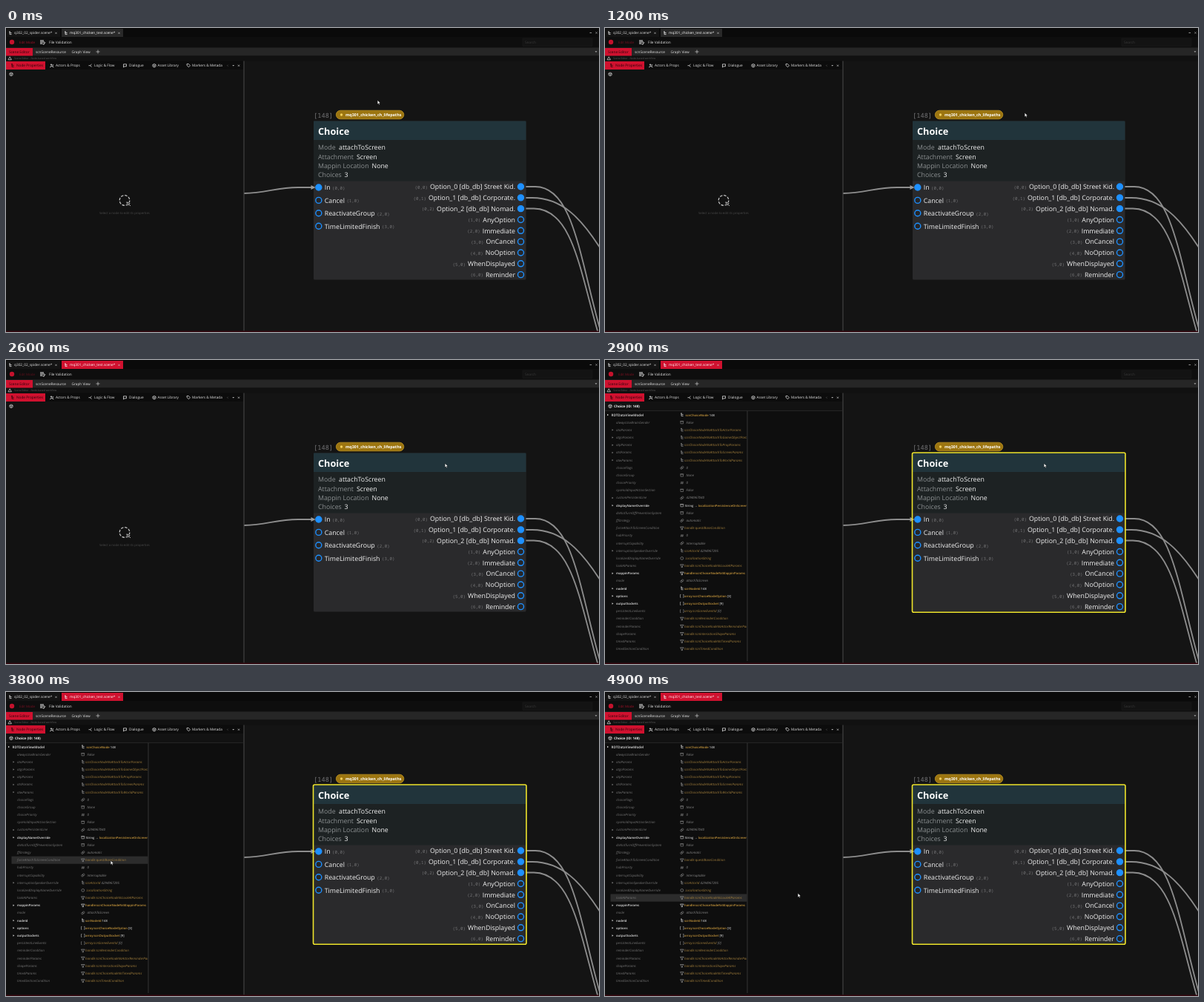
Write an HTML page that moves like this. It is 800 by 410 pixels and loops after 5000 ms.

```html
<!DOCTYPE html>
<html lang="en">
<head>
<meta charset="utf-8">
<title>Scene editor</title>
<style>
html, body { margin: 0; width: 100%; height: 100%; overflow: hidden; background: #111; }
svg { display: block; width: 800px; height: 410px; font-family: "Open Sans", "Noto Sans", sans-serif; text-rendering: geometricPrecision; }
text { white-space: pre; }
.mono { font-family: "Noto Sans Mono", "DejaVu Sans Mono", monospace; fill: #747476; }
.b { font-weight: 700; }
.s { font-weight: 600; }
.i { font-style: italic; }

.idle, .picked, .framed, .tab, .hot { animation: 5s step-end infinite; }
.idle { animation-name: idle; }
.picked { animation-name: picked; }
.framed { animation-name: framed; }
.tab { animation-name: tab; }
.row-a { animation-name: row-a; }
.row-b { animation-name: row-b; }
.socket { animation-name: socket; }
.mode { animation: mode 1.6667s ease-in-out infinite; }
.cursor { animation: move 5s linear infinite; }

@keyframes idle { 0% { opacity: 1 } 58%, 100% { opacity: 0 } }
@keyframes picked { 0% { opacity: 0 } 58%, 100% { opacity: 1 } }
@keyframes framed { 0% { opacity: 0 } 56%, 100% { opacity: 1 } }
@keyframes tab { 0% { fill: #292929 } 26% { fill: #7c1a2a } 28%, 100% { fill: #d0112f } }
@keyframes row-a { 0% { opacity: 0 } 74% { opacity: 1 } 80%, 100% { opacity: 0 } }
@keyframes row-b { 0% { opacity: 0 } 92%, 100% { opacity: 1 } }
@keyframes socket { 0% { opacity: 0 } 80% { opacity: 1 } 88%, 100% { opacity: 0 } }
@keyframes mode { 0%, 100% { opacity: .75 } 50% { opacity: .4 } }
@keyframes move {
  0% { transform: translate(502px, 100px); animation-timing-function: steps(12) }
  24% { transform: translate(567px, 117px); animation-timing-function: steps(12) }
  48%, 66% { transform: translate(593px, 142px); animation-timing-function: steps(4) }
  74%, 78% { transform: translate(142px, 230px); animation-timing-function: steps(2) }
  82% { transform: translate(440px, 267px); animation-timing-function: steps(2) }
  86% { transform: translate(392px, 271px); animation-timing-function: steps(4) }
  94% { transform: translate(155px, 277px); animation-timing-function: steps(2) }
  98%, 100% { transform: translate(261px, 274px) }
}
</style>
</head>
<body>
<svg id="stage" viewBox="0 0 800 410" xmlns="http://www.w3.org/2000/svg"></svg>
<script>
const BLUE = '#1e90ff', RED = '#d0112f';

const rect = (x, y, w, h, fill, more = '') =>
  `<rect x="${x}" y="${y}" width="${w}" height="${h}" fill="${fill}" ${more}/>`;
const circle = (x, y, r, fill, more = '') =>
  `<circle cx="${x}" cy="${y}" r="${r}" fill="${fill}" ${more}/>`;
const line = (d, stroke, w = 1, more = '') =>
  `<path d="${d}" fill="none" stroke="${stroke}" stroke-width="${w}" ${more}/>`;
const text = (x, y, size, fill, str, more = '') =>
  `<text x="${x}" y="${y}" font-size="${size}" fill="${fill}" ${more}>${str}</text>`;
const ui = (x, y, str, fill = '#e4e4e4') => text(x, y + 1.7, 4.75, fill, str);
const cross = (x, y, fill = '#ccc') =>
  line(`M${x - 1.1} ${y - 1.1}l2.2 2.2m0 -2.2l-2.2 2.2`, fill, .6);
const cube = (x, y, fill = '#ddd') =>
  line(`M${x} ${y - 2.3}l2.1 1.1v2.4l-2.1 1.1l-2.1 -1.1v-2.4zm-2.1 1.1l2.1 1.1l2.1 -1.1m-2.1 1.1v2.4`, fill, .7);
const tree = (x, y, fill) =>
  line(`M${x - 2} ${y - 2}h2m-1 0v3.6h2.6m-2.6 -2h2.6`, fill, .8);

function chrome() {
  return rect(0, 0, 800, 12, '#0a0a0a') + rect(0, 12, 800, 14.5, '#0e0e0e') +
    rect(0, 26.5, 800, 11, '#262626') + rect(0, 37.5, 800, 7, '#111') +
    rect(1, 1, 72, 11, '#141414') +
    `<rect class="tab" x="75" y="1" width="83" height="11" fill="#292929"/>` +
    tree(6, 7, '#ddd') + ui(11, 6.6, 'q302_02_spider.scene*') + cross(67.5, 6.8) +
    tree(81, 7, '#eee') + ui(86, 6.6, 'mq301_chicken_test.scene*', '#fff') + cross(152.5, 6.8) +
    line('M787.5 6.5h2.6', '#ccc', .7) + cross(796.5, 6.5) +
    circle(8, 19, 3.2, '#c4122d') +
    text(18, 20.8, 4.45, RED, 'Edit Mode', 'class="mode"') +
    line('M46 17h5m-5 2h6m-6 2h3', '#eee', 1) + line('M49.5 21l1.2 1.3l2.2 -3', '#eee', 1) +
    ui(58, 19, 'File Validation') +
    rect(697, 14, 94, 10.5, '#131313', 'stroke="#1b1b1b" stroke-width=".6"') + ui(700, 19.2, 'Search', '#383838') +
    rect(0, 27, 36, 10.5, RED) + ui(4, 32, 'Scene Editor', '#26040a') +
    ui(40, 32, 'scnSceneResource') + ui(88.5, 32, 'Graph View') +
    line('M121.5 32h5m-2.5 -2.5v5', '#ccc', .7) +
    `<path d="M794.5 31.2h3l-1.5 1.7z" fill="#aaa"/>` +
    line('M3 42.8l2.2 -4l2.2 4z', '#ccc', .8) +
    text(11, 42.3, 3.4, '#5c5c5c', 'Scene Editor - Node-based workflow');
}

function sideTabs() {
  return rect(0, 44.5, 320.5, 364, '#121212') + rect(0, 44.5, 320.5, 11.5, '#0c0c0c') +
    rect(0, 45, 53, 11, RED) + tree(9, 50.7, '#26040a') + ui(14, 50.6, 'Node Properties', '#26040a') +
    circle(61, 49.5, 1, '#ddd') + circle(63.3, 50, .8, '#ddd') + line('M59.3 52.8q2.5 -2.8 5 0', '#ddd', 1) +
    ui(67, 50.6, 'Actors &amp; Props') +
    line('M111.5 50.7h2l2 -1.8m-2 1.8l2 1.8', '#ddd', .8) + ui(119, 50.6, 'Logic &amp; Flow') +
    line('M158.5 48.8h4v3h-2.5l-1.5 1.2z', '#ddd', .8) + ui(166, 50.6, 'Dialogue') +
    cube(200, 50.7) + ui(204.5, 50.6, 'Asset Library') +
    line('M244 48.5h2.3l2.2 2.2l-2 2l-2.5 -2.3z', '#ddd', .8) + ui(251, 50.6, 'Markers &amp; Metada') +
    line('M299.5 49.7l-1 1l1 1', '#777', .5) +
    `<path d="M305.3 50h2.8l-1.4 1.6z" fill="#bbb"/>` + cross(314, 50.7, '#ddd') +
    cube(7, 62.3);
}

function placeholder() {
  return `<g class="idle">` +
    circle(160, 232.5, 6.8, 'none', 'stroke="#c2c2c2" stroke-width="1.3" stroke-dasharray="3.5 1.84"') +
    rect(163, 235, 6, 6, '#121212') +
    line('M162.8 234.8l4.4 1.7l-1.9 .9l-.9 1.9zm2.6 2.6l2.6 2.6', '#c2c2c2', .9) +
    text(126, 250.5, 4.28, '#4a4a4a', 'Select a node to edit its properties') + `</g>`;
}

// mark (+ expandable, * strong) | label | icon | value | extra
const ROWS = `
+*|RDTDataViewModel|t|scnChoiceNode|148
|alwaysUseBrainGender|b||False
+|ataParams|t|scnChoiceNodeNsAttachToActorParams
+|atgoParams|t|scnChoiceNodeNsAttachToGameObjectParams
+|atpParams|t|scnChoiceNodeNsAttachToPropParams
+|atsParams|t|scnChoiceNodeNsAttachToScreenParams
+|atwParams|t|scnChoiceNodeNsAttachToWorldParams
|choiceFlags|l||0
|choiceGroup|b||None
|choicePriority|#||0
|cpoHoldInputActionSection|b||False
+|customPersistentLine|l||4294967040
+*|displayNameOverride|b||String → |localizationPersistenceOnScreen
|doNotTurnOffPreventionSystem|b||False
|ffStrategy|l||automatic
|forceAttachToScreenCondition|h|handle:questIBaseCondition
|hubPriority|#||0
|interruptCapability|l||Interruptable
+|interruptionSpeakerOverride|t|scnActorId|4294967295
|localizedDisplayNameOverride|o|LocalizationString
|lookAtParams|h|handle:scnChoiceNodeNsLookAtParams
+*|mappinParams|h|handle:scnChoiceNodeNsMappinParams
|mode|l||attachToScreen
+*|nodeId|t|scnNodeId|148
+*|options|a|array:scnChoiceNodeOption|[3]
+*|outputSockets|a|array:scnOutputSocket|[9]
|persistentLineEvents|a|array:scnSceneEventId|[0]
|reminderCondition|h|handle:scnReminderCondition
|reminderParams|h|handle:scnChoiceNodeNsActorReminderParams
|shapeParams|h|handle:scnInteractionShapeParams
|timedParams|h|handle:scnChoiceNodeNsTimedParams
|timedSectionCondition|h|handle:scnTimedCondition`.trim().split('\n').map(r => r.split('|'));

const rowY = n => 74 + n * 10.18;

const ICONS = {
  t: (y, c) => tree(104, y, c),
  b: (y, c) => line(`M102 ${y - 1.5}h3.5v3.2h-3.5zm-.8 0h5`, c, .6),
  l: (y, c) => circle(103, y + .7, 1.3, 'none', `stroke="${c}" stroke-width=".6"`) + circle(104.7, y - .7, 1.3, 'none', `stroke="${c}" stroke-width=".6"`),
  '#': (y, c) => line(`M103.2 ${y - 1.8}l-.6 3.6m2.5 -3.6l-.6 3.6m-2.5 -2.5h4m-4.3 1.4h4`, c, .5),
  h: (y, c) => line(`M101.5 ${y - 1.7}h4.6l-1.6 2v1.7h-1.4v-1.7z`, c, .8),
  o: (y, c) => circle(103.8, y, 1.9, 'none', `stroke="${c}" stroke-width=".7"`),
  a: (y, c) => line(`M102.5 ${y - 1.9}h-1v3.8h1m2.6 -3.8h1v3.8h-1`, c, .6)
};

function property([mark, label, icon, type, plain = '', link = ''], n) {
  const y = rowY(n), strong = mark.includes('*'), open = mark.includes('+');
  const gray = strong ? '#c0c0c0' : '#8a8a8a', gold = strong ? '#c4953c' : '#a5803d';
  const face = strong ? 'class="s"' : 'class="i"';
  const size = strong ? (n ? 4.25 : 4.6) : 4.45;
  const x = !type ? 109.5 : n && icon !== 'o' ? 107 : 108.5;
  const gap = type && plain ? ' ' : '';
  const value = `<tspan fill="${gold}">${type}</tspan>${gap}${plain}<tspan fill="${gold}">${link}</tspan>`;
  return (open ? `<path d="M${n ? 9.5 : 3} ${y - 1.2}l1.8 1.2l-1.8 1.2z" fill="${strong ? '#ddd' : '#888'}"/>` : '') +
    text(n ? 15 : 8.5, y + 1.5, size, strong ? '#e2e2e2' : '#767676', label, face) +
    ICONS[icon](y, gray) + text(link ? 107.5 : x, y + 1.5, strong ? 4.2 : 4.45, gray, value, face);
}

function properties() {
  const bar = (n, name) => `<g class="hot ${name}">` + rect(7.5, rowY(n) - 5.1, 184, 10.2, '#2c2c2c') + `</g>`;
  return `<g class="picked">` + rect(0, 68, 320.5, 340, '#0e0e0e') +
    text(12, 64.2, 4.6, '#eee', 'Choice (ID: 148)', 'class="b"') +
    line('M0 68.5H320', '#2a2a2a', .8) + line('M192 68.5V406', '#343434', 1) +
    bar(15, 'row-a') + bar(20, 'row-b') +
    `<g clip-path="url(#cols)">${ROWS.map(property).join('')}</g></g>`;
}

function pin(x, y, full) {
  return circle(x, y, 4, full ? BLUE : '#262628', `stroke="${BLUE}" stroke-width="1.4"`);
}

function wires() {
  const wire = d => line(d, '#8d8d8d', 1.8);
  return wire('M321 223C352 222.5 364 215 394 215H413') +
    wire('M699 214H714C766 214 774 312 803 412') +
    wire('M699 229H710C750 229 776 257 801 296') +
    wire('M699 243.5H712C764 243.5 774 326 799 412');
}

function node() {
  const facts = [['Mode', 'attachToScreen', 449], ['Attachment', 'Screen', 473],
    ['Mappin Location', 'None', 493.5], ['Choices', '3', 456.5]];
  const inputs = ['In', 'Cancel', 'ReactivateGroup', 'TimeLimitedFinish'];
  const outputs = ['Option_0 [db_db] Street Kid.', 'Option_1 [db_db] Corporate.', 'Option_2 [db_db] Nomad.',
    'AnyOption', 'Immediate', 'OnCancel', 'NoOption', 'WhenDisplayed', 'Reminder'];
  const tag = (s, dx = 0) => `<tspan class="mono" font-size="5.8" dx="${dx}" dy="-.6">${s}</tspan>`;
  let out = text(415, 120.5, 8.7, '#747476', '[148]', 'class="mono"') +
    rect(445.3, 111.2, 91.5, 11.6, '#9c7510', 'rx="5.8" stroke="#bd9423" stroke-width=".8"') +
    circle(452.5, 117, 1.7, '#f4cf58') +
    text(458, 118.9, 5.4, '#fff', 'mq301_chicken_ch_lifepaths', 'class="b"') +
    rect(415, 125.5, 286.5, 214, '#2a2a2c', 'rx="1.5"') +
    rect(415, 125.5, 286.5, 25.5, '#21343b') + rect(415, 151, 286.5, 55.5, '#1d2223') +
    text(421, 143.6, 12.7, '#fff', 'Choice', 'class="b"');
  facts.forEach(([key, value, x], n) => {
    const y = 164.4 + n * 12.35;
    out += text(421, y, 8.8, '#8c9092', key) + text(x, y, 8.8, '#f2f2f2', value);
  });
  out += `<g class="hot socket">${rect(417, 260, 109, 14.5, 'url(#glow)')}</g>`;
  inputs.forEach((s, n) => {
    const y = 215 + n * 17.4;
    out += pin(421.8, y, n === 0) + text(429.7, y + 3.3, 8.8, '#f2f2f2', s + tag(`(${n},0)`, 2.5));
  });
  outputs.forEach((s, n) => {
    const y = 214 + n * 14.83, id = n < 3 ? `(0,${n})` : `(${n - 2},0)`;
    out += pin(694.5, y, n < 3) +
      text(687, y + 3.3, 8.8, '#f2f2f2', tag(id) + `<tspan dx="3" dy=".6">${s}</tspan>`, 'text-anchor="end"');
  });
  return out + `<path d="M411.5 212l6 3l-6 3z" fill="#9a9a9a"/>` +
    `<g class="framed">${rect(414.5, 125, 287.5, 215.3, 'none', 'rx="2" stroke="#efe52c" stroke-width="1.6"')}</g>`;
}

document.getElementById('stage').innerHTML =
  `<defs><clipPath id="cols"><rect x="0" y="68" width="190.5" height="340"/></clipPath>
  <linearGradient id="glow"><stop stop-color="#1f5fa8"/><stop offset="1" stop-color="#233c5a"/></linearGradient></defs>` +
  rect(0, 0, 800, 410, '#141414') + wires() + node() + chrome() + sideTabs() + placeholder() + properties() +
  line('M321 44.5V408.5', '#424242', 1.2) + rect(0, 408.5, 800, 1.5, '#35070f') +
  `<g class="cursor"><path d="M-.8 -2.6v5.4l1.3 -1.1l.9 1.9l.9 -.4l-.9 -1.9h1.7z" fill="#fff" stroke="#000" stroke-width=".4"/></g>`;
</script>
</body>
</html>
```
